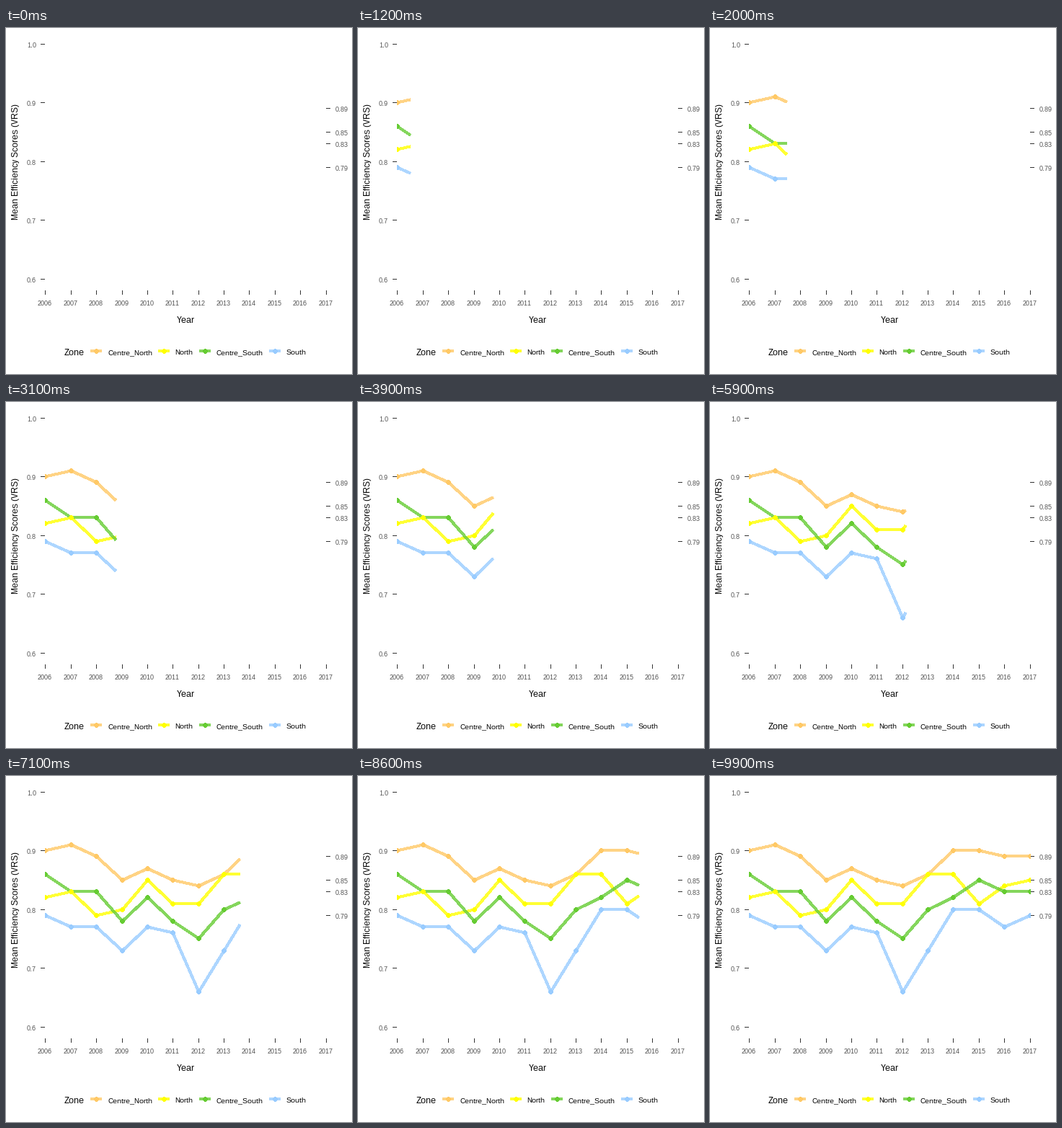
Animation of 480 by 480 pixels, one loop 10000 ms. Source, as a matplotlib script:

```python
import numpy as np
import matplotlib.pyplot as plt
from matplotlib.animation import FuncAnimation
from matplotlib.patches import Circle, Rectangle

plt.rcParams.update({
    "font.family": "Liberation Sans",
    "text.hinting": "native",
    "text.hinting_factor": 1,
    "text.kerning_factor": 6,  # practically no kerning
})

SIZE, DPI = 480, 96
FRAMES, INTERVAL = 100, 100
YEARS = np.arange(2006, 2018)

# name, colour, scores per year, legend key centre, legend text start
ZONES = [
    ("Centre_North", "#FFC966",
     [.90, .91, .89, .85, .87, .85, .84, .86, .90, .90, .89, .89], 125, 141),
    ("North", "#FFFF00",
     [.82, .83, .79, .80, .85, .81, .81, .86, .86, .81, .84, .85], 219, 234),
    ("Centre_South", "#66CC33",
     [.86, .83, .83, .78, .82, .78, .75, .80, .82, .85, .83, .83], 276, 292),
    ("South", "#99CCFF",
     [.79, .77, .77, .73, .77, .76, .66, .73, .80, .80, .77, .79], 373, 389),
]
POINT_ORDER = {"Centre_North": 0, "Centre_South": 1, "North": 2, "South": 3}

# The reveal runs from 2005 to 2017; each year snaps to a whole step.
ARRIVAL = np.round((FRAMES - 1) * (YEARS - 2005) / 12)

# Without antialiasing every touched pixel is filled, so strokes and dots
# are drawn one pixel slimmer than they appear.
LINE_W, DOT_R = 3, 2.7
MID = 0.45  # just short of the pixel centre


def px(year):
    return np.floor(54.4 + 35.38 * (np.asarray(year) - 2006) + 0.5)


def py(score):
    return np.floor(5.48 + 814.8 * (1.02 - np.asarray(score)) + 0.5)


fig = plt.figure(figsize=(SIZE / DPI, SIZE / DPI), dpi=DPI, facecolor="white")
ax = fig.add_axes([0, 0, 1, 1])
ax.set_xlim(0, SIZE)
ax.set_ylim(SIZE, 0)
ax.axis("off")

panel = Rectangle((54, 0), 391, 364, transform=ax.transData)


def label(x, y, text, size, color="black", **kw):
    ax.text(x, y, text, fontsize=size * 72 / DPI, color=color,
            va="baseline", **kw)


def tick(x, y, w, h):
    ax.add_patch(Rectangle((x, y), w, h, fc="#333333", lw=0, aa=False))


def trace(line, xs, ys):
    line.set_data(np.asarray(xs) + MID, np.asarray(ys) + MID)


def stroke(color, z):
    line, = ax.plot([], [], color=color, alpha=0.8, lw=LINE_W * 72 / DPI,
                    aa=False, solid_capstyle="butt", solid_joinstyle="round",
                    snap=False, zorder=z)
    return line


def dot(x, y, color, z):
    return ax.add_patch(Circle((x + 0.5, y + 0.5), DOT_R, fc=color, lw=0,
                               aa=False, snap=False, zorder=z))


GREY = "#4D4D4D"
for year in YEARS:
    tick(px(year), 364, 1, 6)
    label(px(year), 385, str(year), 9, GREY, ha="center")
for score in (0.6, 0.7, 0.8, 0.9, 1.0):
    tick(48, py(score), 6, 1)
    label(42, py(score) + 5, f"{score:.1f}", 9, GREY, ha="right")
for score in (0.79, 0.83, 0.85, 0.89):
    tick(444, py(score), 6, 1)
    label(457, py(score) + 5, f"{score:.2f}", 9, GREY)

label(249, 409, "Year", 12, ha="center")
label(17, 185.5, "Mean Efficiency Scores (VRS)", 12, ha="center",
      rotation=90, rotation_mode="anchor")
label(81, 454, "Zone", 12)

lines, dots = [], []
for i, (name, color, scores, key, start) in enumerate(ZONES):
    trace(stroke(color, 2), [key - 8, key + 7], [448, 448])
    dot(key, 448, color, 3)
    label(start, 453, name, 10)

    line = stroke(color, 4 + 0.1 * i)
    line.set_clip_path(panel)
    lines.append((line, scores))
    for step, year, score in zip(ARRIVAL, YEARS, scores):
        mark = dot(px(year), py(score), color, 5 + 0.1 * POINT_ORDER[name])
        mark.set_clip_path(panel)
        dots.append((step, mark))


def draw(n):
    done = ARRIVAL <= n
    for line, scores in lines:
        if not done.any():
            line.set_data([], [])
            continue
        xs = np.append(YEARS[done], np.interp(n, ARRIVAL, YEARS))
        ys = np.append(np.array(scores)[done], np.interp(n, ARRIVAL, scores))
        trace(line, px(xs), py(ys))
    for step, mark in dots:
        mark.set_visible(step <= n)
    return [line for line, _ in lines] + [mark for _, mark in dots]


anim = FuncAnimation(fig, draw, frames=FRAMES, interval=INTERVAL,
                     repeat=True, repeat_delay=0, blit=False)
plt.show()
```
